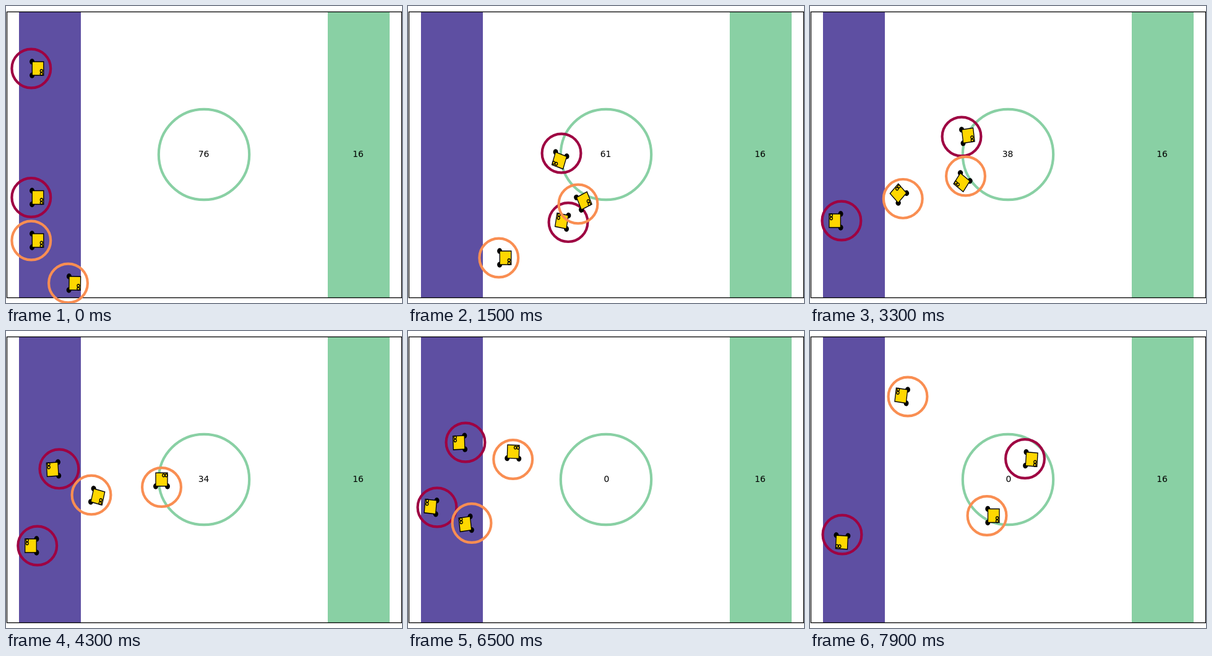
An HTML page with a canvas that plays this animation: 640x480 px, repeating every 8000 ms.

```html
<!DOCTYPE html>
<html>
<head>
<meta charset="utf-8">
<style>
html, body { margin: 0; width: 100%; height: 100%; overflow: hidden; background: #fff; }
canvas { display: block; }
</style>
</head>
<body>
<canvas id="stage" width="640" height="480"></canvas>
<script>
const ctx = document.getElementById('stage').getContext('2d');
const LOOP = 8000, STEP = 100, ASPECT = 1.16;
const PURPLE = '#5e4fa2', GREEN = '#89d0a4', CRIMSON = '#9e0142', ORANGE = '#f98e52';

// Turning points: time, x, y. Each robot faces the way it drives.
const robots = [
  { color: CRIMSON, path: [
    [0, 40.8, 101], [1000, 288, 101], [1500, 248, 238], [2300, 111.7, 238], [2600, 68, 238],
    [3300, 245, 211], [4400, 70, 224], [4800, 130, 182], [5600, 298, 182],
    [5700, 275, 172], [6700, 47.5, 182], [7900, 347.5, 206.5]] },
  { color: CRIMSON, path: [
    [0, 40.8, 309.5], [1000, 312, 309], [1300, 290, 356], [2300, 135, 324], [2800, 51, 347],
    [5600, 50.5, 347], [6300, 65, 287], [6500, 47, 285], [7300, 54, 285], [7900, 52, 329]] },
  { color: ORANGE, path: [
    [0, 40.8, 379], [800, 165, 378.5], [1500, 275, 320], [2300, 268.3, 247.8],
    [3300, 251.5, 275], [4300, 251.5, 252.5], [5000, 260, 246], [5600, 215, 242],
    [6200, 169, 230], [6500, 169.7, 207.5], [7600, 168, 107.5], [7900, 158, 106]] },
  { color: ORANGE, path: [
    [0, 100.5, 448], [800, 165, 449], [1300, 125, 407], [2300, 234, 407], [3900, 100, 254],
    [4300, 138, 265], [5000, 170, 310], [5600, 238.5, 291], [6500, 103, 310.5],
    [7300, 185, 352], [7600, 225, 298.5], [7900, 286, 298.5]] }
];

const stock = [[0, 76], [900, 76], [2300, 42], [4300, 34], [5500, 0], [LOOP, 0]];

const mix = (a, b, p) => a + (b - a) * p;

function segment(keys, t) {
  const i = Math.max(1, keys.findIndex(k => k[0] >= t));
  const a = keys[i - 1], b = keys[i];
  return [a, b, (t - a[0]) / (b[0] - a[0])];
}

function circle(x, y, r) {
  ctx.beginPath();
  ctx.arc(x, y, r, 0, Math.PI * 2);
}

function ring(x, y, r, color) {
  ctx.strokeStyle = color;
  ctx.lineWidth = 4.17;
  circle(x, y, r);
  ctx.stroke();
}

function band(x, color) {
  ctx.fillStyle = color;
  ctx.fillRect(x, 9.5, 100, 462);
}

function label(text, x) {
  ctx.fillStyle = '#000';
  ctx.fillText(text, x, 244);
}

function drawRobot({ color, path }, t) {
  const [[, ax, ay], [, bx, by], p] = segment(path, t);
  const x = mix(ax, bx, p), y = mix(ay, by, p);
  ring(x, y, 31.4, color);
  ctx.save();
  ctx.translate(x, y);
  ctx.scale(1, ASPECT);
  ctx.rotate(Math.atan2((by - ay) / ASPECT, bx - ax));
  ctx.fillStyle = '#000';
  for (const side of [-9.5, 9.5]) {
    circle(1.3, side, 4);
    ctx.fill();
  }
  ctx.strokeStyle = '#000';
  ctx.lineWidth = 1.3;
  ctx.fillStyle = '#ffd700';
  ctx.beginPath();
  ctx.rect(1.5, -9.5, 18.5, 19);
  ctx.fill();
  ctx.stroke();
  for (const side of [3.2, 7.6]) {
    circle(16.5, side, 2);
    ctx.stroke();
  }
  ctx.restore();
}

function draw(now) {
  const t = Math.floor(now % LOOP / STEP) * STEP;
  ctx.fillStyle = '#fff';
  ctx.fillRect(0, 0, 640, 480);
  band(21, PURPLE);
  band(520, GREEN);
  ring(320, 240, 73.2, GREEN);
  ctx.strokeStyle = '#000';
  ctx.lineWidth = 1.3;
  ctx.strokeRect(1.5, 9.5, 638, 462);
  for (const robot of robots) drawRobot(robot, t);

  const [a, b, p] = segment(stock, t);
  const left = Math.round(mix(a[1], b[1], p));
  ctx.font = '13.9px "DejaVu Sans", sans-serif';
  ctx.textAlign = 'center';
  label(left, left ? 319.5 : 321);
  label(16, 569);
  requestAnimationFrame(draw);
}

requestAnimationFrame(draw);
</script>
</body>
</html>
```
